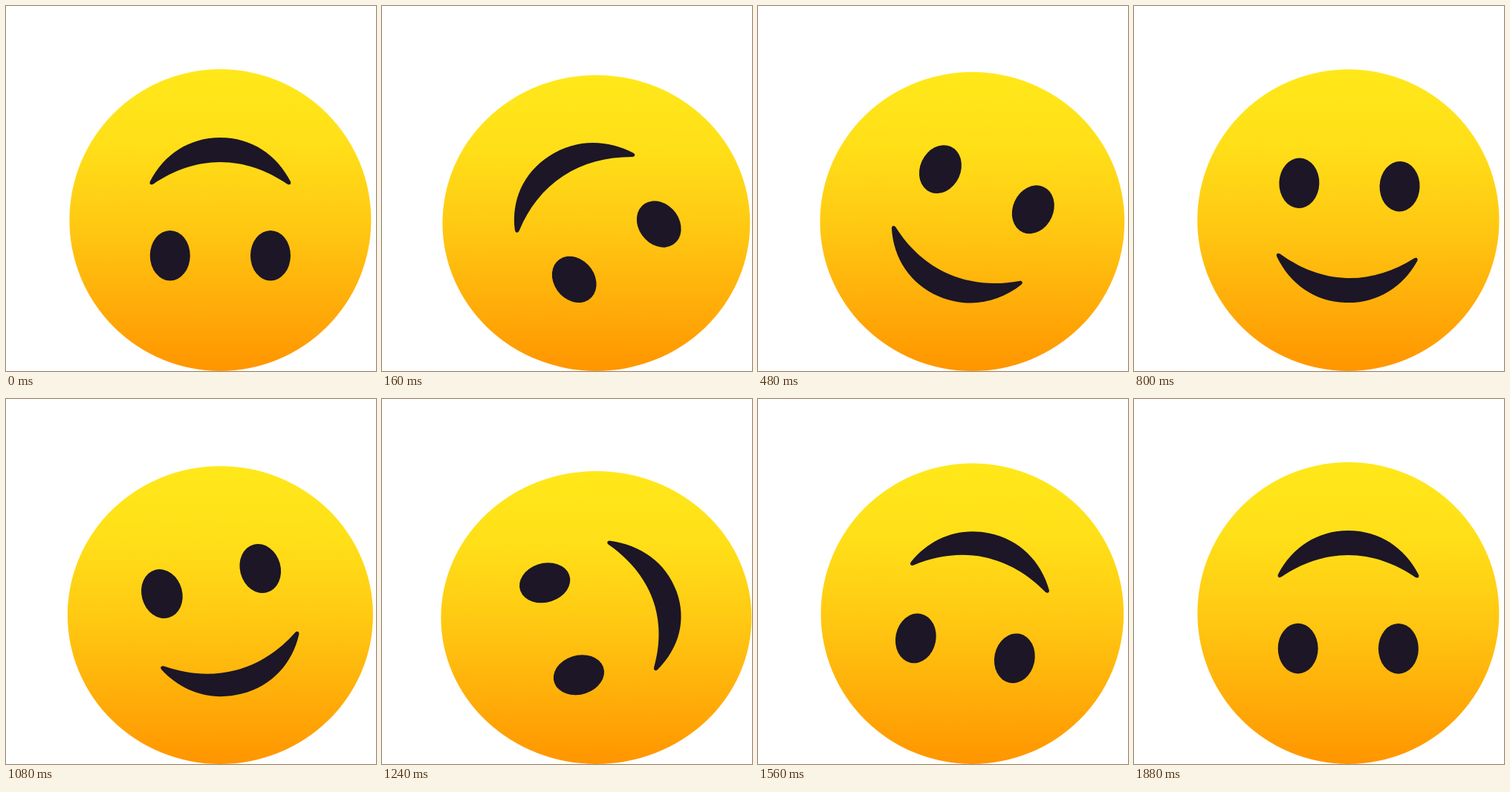
These frames come from a looping animation (498x491 px, 1920 ms). An HTML page with a canvas:

```html
<!DOCTYPE html>
<html>
<head>
<meta charset="utf-8">
<title>Tumbling smile</title>
<style>
  html, body { margin: 0; width: 100%; height: 100%; overflow: hidden; background: #fff; }
  canvas { display: block; }
</style>
</head>
<body>
<canvas id="stage" width="498" height="491"></canvas>
<script>
const ctx = document.getElementById('stage').getContext('2d');
const STEP = 40, TURN = 24;          // ms per step, steps per half turn
const CX = 288.4, FLOOR = 491, R = 203;
const SQUASH = 0.03, PEAK = 6;       // squash amount and the step where it peaks

const skin = ctx.createLinearGradient(0, -R, 0, R);
[[0, '#ffe81a'], [0.25, '#ffdf18'], [0.5, '#ffca13'], [0.75, '#ffb00a'], [1, '#ff9500']]
  .forEach(([at, color]) => skin.addColorStop(at, color));

// Cubic ease with handles (x1, 0) and (x2, 1)
function ease(x, x1, x2) {
  if (x <= 0) return 0;
  if (x >= 1) return 1;
  let lo = 0, hi = 1;
  for (let i = 0; i < 30; i++) {
    const s = (lo + hi) / 2, u = 1 - s;
    if (3 * x1 * s * u * u + 3 * x2 * s * s * u + s * s * s < x) lo = s;
    else hi = s;
  }
  return lo * lo * (3 - 2 * lo);
}

function oval(x, y, rx, ry) {
  ctx.beginPath();
  ctx.ellipse(x, y, rx, ry, 0, 0, Math.PI * 2);
  ctx.fill();
}

function mouth() {
  ctx.beginPath();
  ctx.moveTo(-94.5, -52);
  ctx.bezierCurveTo(-76, -88, -42, -111, 0, -111);
  ctx.bezierCurveTo(42, -111, 76, -88, 94.5, -52);
  ctx.bezierCurveTo(96, -48.5, 93.5, -46.5, 90, -48.5);
  ctx.bezierCurveTo(63, -67, 32, -78, 0, -78);
  ctx.bezierCurveTo(-32, -78, -63, -67, -90, -48.5);
  ctx.bezierCurveTo(-93.5, -46.5, -96, -48.5, -94.5, -52);
  ctx.fill();
}

function draw(step) {
  const half = Math.floor(step / TURN), n = step % TURN;
  const angle = -Math.PI * (half + ease(n / TURN, 1 / 3, 0));
  const press = n < PEAK
    ? ease(n / PEAK, 1 / 3, 0.82)
    : 1 - ease((n - PEAK) / (TURN - PEAK), 1 / 3, 0);
  const sx = 1 + SQUASH * press, sy = 1 - SQUASH * press;

  ctx.fillStyle = '#fff';
  ctx.fillRect(0, 0, 498, 491);
  ctx.save();
  ctx.translate(CX, FLOOR - R * sy);
  ctx.scale(sx, sy);
  ctx.fillStyle = skin;
  oval(0, 0, R, R);
  ctx.rotate(angle);
  ctx.fillStyle = '#1c1626';
  mouth();
  oval(-67.6, 47.7, 27, 33.8);
  oval(67.6, 47.7, 27, 33.8);
  ctx.restore();
}

const start = performance.now();
function tick() {
  const t = performance.now() - start;
  draw(Math.floor(t / STEP) % (TURN * 2));
  requestAnimationFrame(tick);
}
tick();
</script>
</body>
</html>
```
